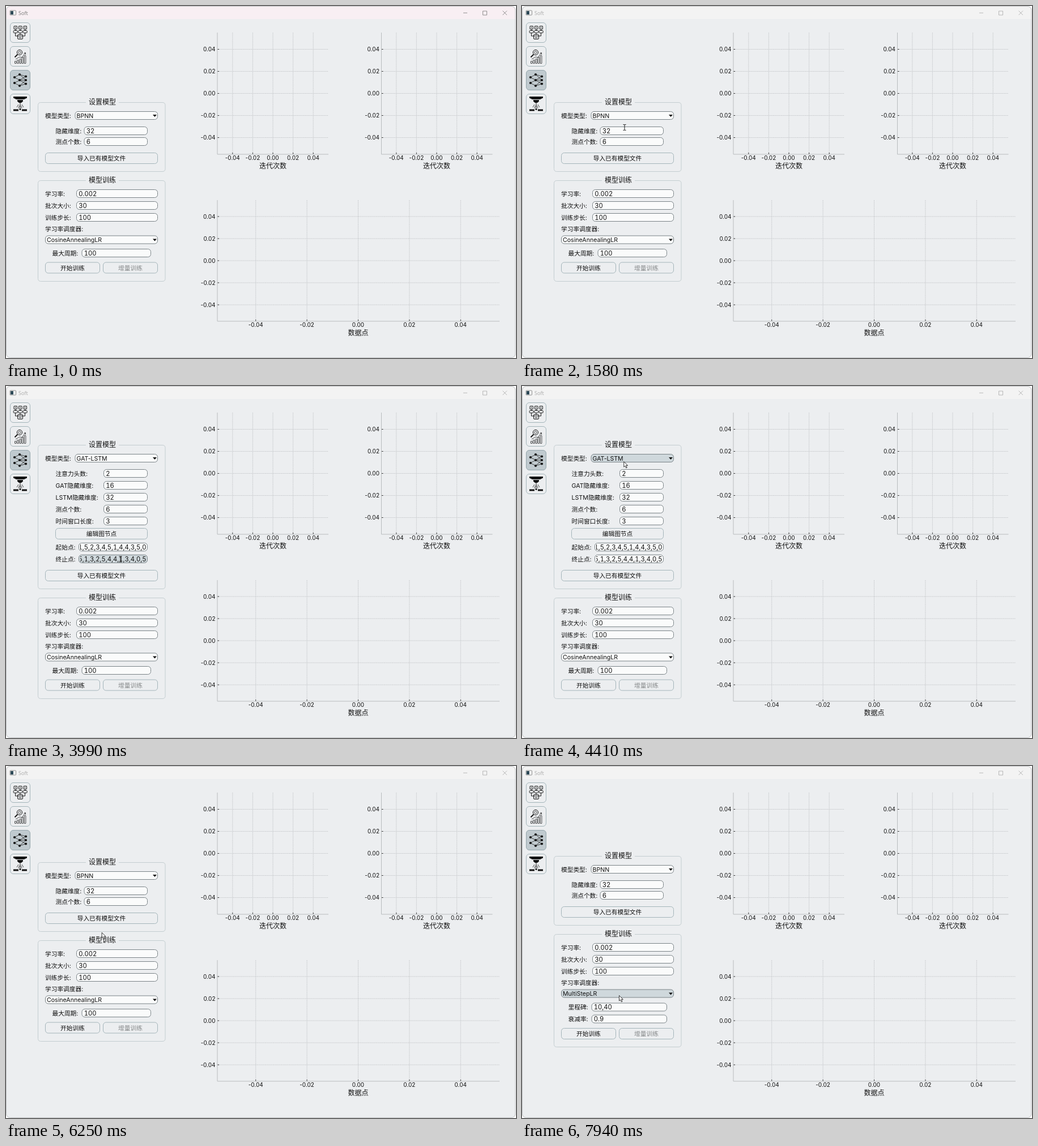
Recreate the animation shown at these times as an HTML page. Size 900 by 622 pixels, loop 8000 ms.

```html
<!DOCTYPE html>
<html lang="zh-CN">
<head>
<meta charset="utf-8">
<title>Soft</title>
<style>
  html, body { margin: 0; width: 100%; height: 100%; overflow: hidden; background: #fff; }
  svg { display: block; width: 900px; height: 622px; }
  text { font: 10.7px Inter, "Noto Sans CJK SC", "Noto Sans CJK", sans-serif; fill: #111; }
  .mid { text-anchor: middle; }
  .end { text-anchor: end; }
  .head { font-size: 12px; }
  .tick { font: 10px Inter, sans-serif; }
  .value { font: 11.2px Inter, sans-serif; font-variant-numeric: tabular-nums; }
  .choice { font: 10.6px Inter, sans-serif; }
  .off { fill: #858889; }
  .caption { font: 9px "Open Sans", sans-serif; fill: #777; }
  .grid { stroke: #c3c6c8; stroke-width: .8; stroke-dasharray: 2 .8; }
  .spine { fill: none; stroke: #b9bcbe; }
  .notch { stroke: #333; }
  .group { fill: none; stroke: #c3cdd0; }
  .field, .combo { fill: #fafbfb; stroke: #7a8387; }
  .button, .tool { fill: #eceef0; stroke: #a4b5ba; }
  .tool.on { fill: #c0cacf; stroke: #93a5ab; }
  .hover { fill: #cfd8dc; }
  .ink { fill: none; stroke: #1b1b1b; }
  .fine { fill: none; stroke: #222; stroke-width: .8; }
  .control { fill: none; stroke: #777; stroke-width: .8; }
  .solid { fill: #111; }
</style>
</head>
<body>
<svg id="stage" viewBox="0 0 900 622"></svg>
<script>
const LOOP = 8000;
const stage = document.getElementById('stage');

const text = (x, y, s, cls = '') => `<text x="${x}" y="${y}" class="${cls}">${s}</text>`;
const box = (x, y, w, h, r, cls, extra = '') =>
  `<rect x="${x}" y="${y}" width="${w}" height="${h}" rx="${r}" class="${cls}" ${extra}/>`;
const line = (x1, y1, x2, y2, cls) =>
  `<line x1="${x1}" y1="${y1}" x2="${x2}" y2="${y2}" class="${cls}"/>`;
const path = (d, cls, extra = '') => `<path d="${d}" class="${cls}" ${extra}/>`;
const dot = (x, y, r, cls) => `<circle cx="${x}" cy="${y}" r="${r}" class="${cls}"/>`;

// Empty chart: five labelled grid lines on each axis
function chart(left, right, top, bottom, midX, stepX, midY, label) {
  let out = '';
  for (let i = -2; i <= 2; i++) {
    const x = midX + i * stepX, y = midY - i * 39, s = (i * 0.02).toFixed(2);
    out += line(x, top, x, bottom, 'grid') + line(left, y, right, y, 'grid')
      + line(x, bottom - 3, x, bottom, 'notch') + line(left, y, left + 3, y, 'notch')
      + text(x, bottom + 10, s, 'tick mid') + text(left - 3.5, y + 3.5, s, 'tick end');
  }
  return out + path(`M${left} ${top}V${bottom}H${right}`, 'spine')
    + text(midX, bottom + 25, label, 'head mid');
}

function toolIcons() {
  let out = '';
  for (const x of [13.5, 22, 30.5]) {
    out += box(x + .5, 35.5, 5.5, 5.5, .5, 'ink') + line(x + 3.2, 37, x + 3.2, 39.5, 'ink')
      + box(x - .3, 43.5, 7, 4, 1, 'ink') + line(x + 3.2, 41, x + 3.2, 43.5, 'ink');
  }
  out += path('M16.5 47.5V53H20.5M33.5 47.5V53H29.5M25 47.5V50', 'ink')
    + box(20.5, 50.5, 9, 8, 1.5, 'ink') + path('M20.5 53H29.5M22.5 56H27.5', 'ink');

  [4, 6, 8, 11, 14].forEach((h, i) => {
    out += box(15.5 + i * 4.2, 101.5 - h, 2.6, h, .5, 'fine');
  });
  out += dot(24, 82, 4.6, 'ink') + dot(24, 82, 2.2, 'fine')
    + path('M20.5 85.5L15.5 90.5', 'ink', 'stroke-width="2"')
    + path('M17 94L24 90 28 91 34 83M31.5 83.5L34.5 82.5 34.5 86', 'fine');

  const layers = [[[15, 126], [15, 136]], [[24, 121], [24, 131], [24, 141]],
    [[35, 124.5], [35, 131], [35, 137.5]]];
  for (let i = 0; i < 2; i++)
    for (const a of layers[i]) for (const b of layers[i + 1])
      if (Math.abs(a[1] - b[1]) < 12) out += line(...a, ...b, 'fine');
  for (const p of layers.flat()) out += dot(...p, 2.1, 'solid');

  return out + path('M13 160H37V162.5L32 165H18L13 162.5ZM20 166H30V168.5L27 171H23L20 168.5Z'
    + 'M13 182.5H22V185.5H13ZM28 182.5H37V185.5H28Z', 'solid')
    + path('M25 171V181', 'ink')
    + path('M22 174L19 179M28 174L31 179M23.5 176L22 181M26.5 176L28 181', 'fine')
    + dot(25, 182.5, 1.6, 'solid');
}

function frame() {
  const bar = 'M.5 23V7.5Q.5.5 7.5.5H892Q899 .5 899 7.5V23Z';
  let out = box(.5, .5, 898.5, 621, 7, '', 'fill="#eceef0"')
    + path(bar, '', 'fill="#f3f3f3"') + path(bar, '', 'id="accent" fill="#f8eff3"')
    + box(.5, .5, 898.5, 621, 7, '', 'fill="none" stroke="#bfc1c3"')
    + box(7, 8, 10.5, 8, 1, '', 'fill="#fff" stroke="#888"')
    + box(8, 9, 5, 6, 0, '', 'fill="#2f4a58"')
    + '<g id="caption">' + text(22, 15.5, 'Soft', 'caption')
    + path('M807 12.2H814M841.5 9H848.5V16H841.5ZM876.5 8.5L884 16M884 8.5L876.5 16', 'control') + '</g>';
  for (let i = 0; i < 4; i++)
    out += box(7.5, 29.5 + 42 * i, 35, 35, 5.5, i === 2 ? 'tool on' : 'tool');
  return out + toolIcons()
    + chart(373, 569, 47, 262, 471, 35.6, 154.5, '迭代次数')
    + chart(662.5, 858.5, 47, 262, 760, 35.6, 154.5, '迭代次数')
    + chart(373, 871, 343, 557, 621.5, 90.4, 450, '数据点');
}

// A form is its markup plus the hit areas of its widgets
function makeForm(top, graphModel, milestones) {
  const widgets = [];
  let out = '';
  const widget = (kind, left, right, mid, h) => {
    widgets.push({ kind, left, right, top: mid - h / 2 - .5, bottom: mid + h / 2 + .5 });
    out += box(left + .5, mid - h / 2, right - left - 1, h, 5, kind, 'data-widget');
  };
  const button = (left, right, mid, s, cls = '') => {
    widget('button', left, right, mid, 19);
    out += text((left + right) / 2, mid + 4, s, 'mid ' + cls);
  };
  const label = (x, mid, s) => { out += text(x, mid + 4, s); };
  const field = (x, s, left, right, mid, value) => {
    label(x, mid, s);
    widget('field', left, right, mid, 14);
    out += text(left + 4.3, mid + 4, value, 'value');
  };
  const list = (s, mid, value) => {
    label(87.5, mid, s);
    widget('field', 128, 250, mid, 14);
    out += `<g clip-path="url(#inner)">${text(247.5, mid + 4, value, 'value end')}</g>`;
  };
  const combo = (left, mid, value) => {
    widget('combo', left, 268, mid, 14);
    out += text(left + 3, mid + 4, value, 'choice')
      + path(`M259 ${mid - 1.5}h7l-3.5 4z`, 'solid');
  };
  const group = (y, h, s) => {
    out += path(`M141 ${y + .5}H61.5q-5 0-5 5v${h - 10}q0 5 5 5H276q5 0 5-5v${10 - h}q0-5-5-5H199`, 'group')
      + text(170, y + 4, s, 'head mid');
  };

  const height = graphModel ? 254 : 122;
  group(top, height, '设置模型');
  label(69, top + 23.5, '模型类型:');
  combo(121.5, top + 23.5, graphModel ? 'GAT-LSTM' : 'BPNN');
  if (graphModel) {
    [['注意力头数:', 2], ['GAT隐藏维度:', 16], ['LSTM隐藏维度:', 32], ['测点个数:', 6], ['时间窗口长度:', 3]]
      .forEach(([s, v], i) => field(87.5, s, 172, 250, top + 50.5 + 21 * i, v));
    button(87, 250, top + 157, '编辑图节点');
    list('起始点:', top + 180.5, '0,1,5,2,3,4,5,1,4,4,3,5,0');
    list('终止点:', top + 201.5, '1,5,1,3,2,5,4,4,1,3,4,0,5');
  } else {
    field(87.5, '隐藏维度:', 137.5, 250, top + 50.5, 32);
    field(87.5, '测点个数:', 137.5, 250, top + 69.5, 6);
  }
  button(69, 268, top + height - 23, '导入已有模型文件');

  const base = top + height + 16;
  group(base, milestones ? 199 : 178, '模型训练');
  [['学习率:', '0.002'], ['批次大小:', 30], ['训练步长:', 100]]
    .forEach(([s, v], i) => field(69, s, 124, 268, base + 23.5 + 21 * i, v));
  label(69, base + 85.5, '学习率调度器:');
  combo(69, base + 105, milestones ? 'MultiStepLR' : 'CosineAnnealingLR');
  if (milestones) {
    field(81.5, '里程碑:', 122.5, 256, base + 129, '10,40');
    field(81.5, '衰减率:', 122.5, 256, base + 150, '0.9');
  } else {
    field(81.5, '最大周期:', 133.5, 256, base + 128.5, 100);
  }
  const foot = base + (milestones ? 176 : 154.5);
  button(69, 166, foot, '开始训练');
  button(171, 268, foot, '增量训练', 'off');
  return { markup: `<g data-form>${out}</g>`, widgets };
}

const forms = [makeForm(170, false, false), makeForm(104, true, false), makeForm(159, false, true)];

stage.innerHTML = '<clipPath id="inner"><rect x="131" y="0" width="117" height="622"/></clipPath>'
  + frame() + forms.map(f => f.markup).join('')
  + path('M.5.5V10L2.7 8 4.4 11.8 6 11.1 4.4 7.4H7.3Z', '',
    'id="arrow" fill="#fff" stroke="#222" stroke-width=".9"')
  + path('M-2.5-5H-.6L0-4.5.6-5H2.5M0-4.5V4.5M-2.5 5H-.6L0 4.5.6 5H2.5', 'ink', 'id="beam"');

const [arrow, beam, accent, caption] =
  ['arrow', 'beam', 'accent', 'caption'].map(id => document.getElementById(id));
stage.querySelectorAll('[data-form]').forEach((node, i) => {
  forms[i].node = node;
  node.querySelectorAll('[data-widget]').forEach((rect, j) => forms[i].widgets[j].rect = rect);
});

// Pointer stops: time, x, y
const stops = [
  [300, 528, 554], [410, 332, 375], [580, 332, 375], [850, 290, 270], [1270, 181, 191],
  [1440, 181, 191], [1730, 181, 240], [2150, 181, 240], [2470, 183, 192], [3010, 183, 192],
  [3040, 183, 197], [3230, 183, 197], [3690, 202, 306], [3990, 202, 306], [4440, 179, 131],
  [5720, 179, 131], [6520, 165, 352], [6560, 165, 352], [6880, 166, 406], [7130, 168, 410],
  [7690, 168, 410], [7940, 171, 405]
];
// A combo stays lit after its choice until the pointer moves
const stale = [[2730, 3010, 0], [5480, 5720, 0], [7290, 7420, 1]];

function pointerAt(t) {
  const i = stops.findIndex(s => s[0] > t);
  if (i < 0) return stops[stops.length - 1].slice(1);
  const [t0, x0, y0] = stops[i - 1], [t1, x1, y1] = stops[i];
  const p = (t - t0) / (t1 - t0), e = p * p * (3 - 2 * p);
  return [x0 + (x1 - x0) * e, y0 + (y1 - y0) * e];
}

function render(t) {
  const active = 1 - Math.min(1, Math.max(0, (t - 20) / 140));
  accent.setAttribute('opacity', active);
  caption.setAttribute('opacity', .6 + .4 * active);

  const form = forms[t >= 7290 ? 2 : t >= 2730 && t < 5480 ? 1 : 0];
  for (const f of forms) f.node.style.display = f === form ? '' : 'none';

  const shown = t >= 300;
  const [x, y] = shown ? pointerAt(t) : [-50, -50];
  const under = form.widgets.find(w => x >= w.left && x < w.right && y >= w.top && y < w.bottom);
  const kept = stale.find(s => t >= s[0] && t < s[1]);
  const popup = t >= 1440 && t < 2730;
  const lit = kept ? form.widgets.filter(w => w.kind === 'combo')[kept[2]]
    : popup && under && under.kind !== 'combo' ? null : under;
  for (const w of form.widgets) w.rect.classList.toggle('hover', w === lit);

  const typing = !kept && under && under.kind === 'field';
  arrow.style.display = shown && !typing ? '' : 'none';
  beam.style.display = shown && typing ? '' : 'none';
  (typing ? beam : arrow).setAttribute('transform', `translate(${x} ${y})`);
}

const start = performance.now();
function loop() {
  render((performance.now() - start) % LOOP);
  requestAnimationFrame(loop);
}
loop();
</script>
</body>
</html>
```
